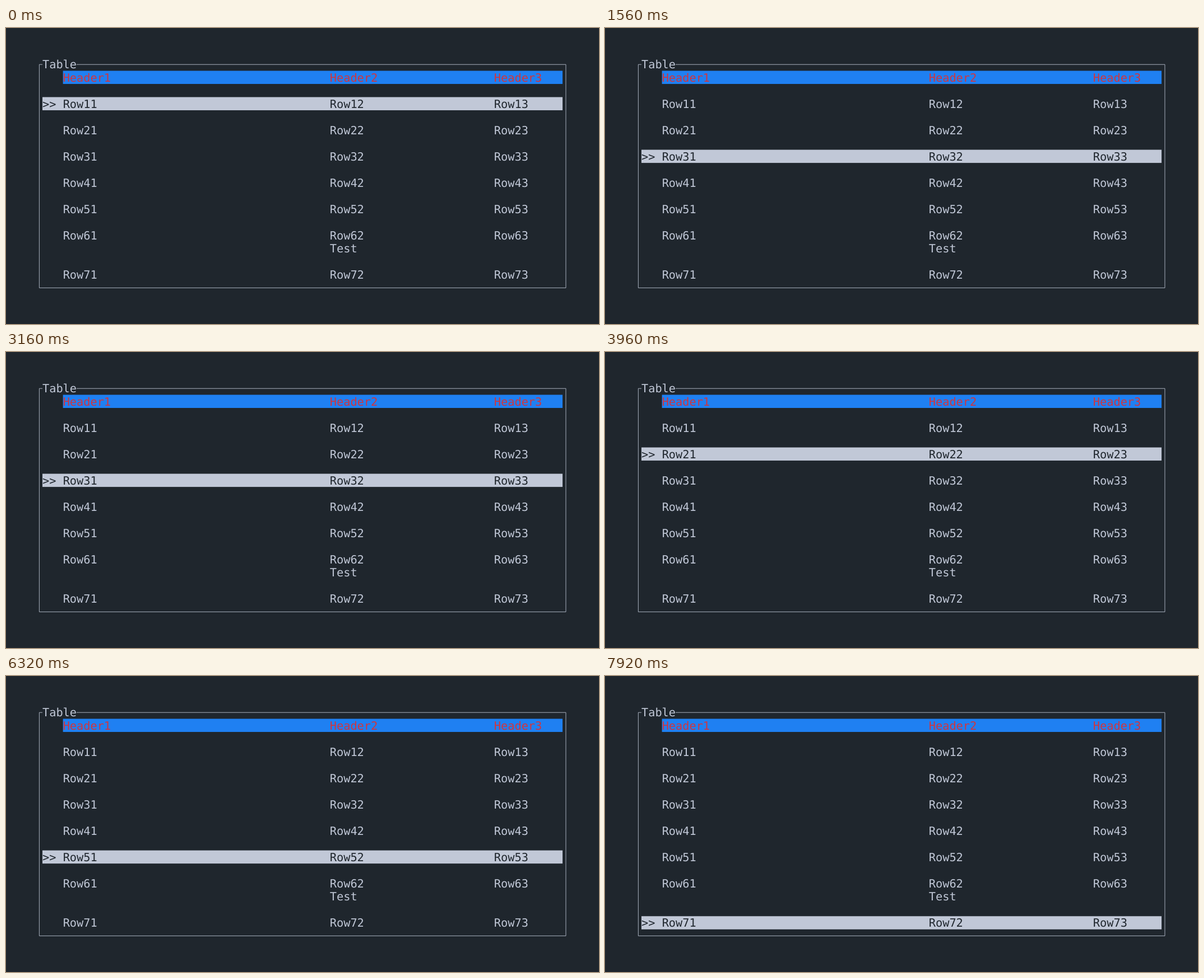
Write an HTML page that moves like this. It is 1058 px wide and 529 px high and loops after 8 s.

```html
<!DOCTYPE html>
<html lang="en">
<head>
<meta charset="utf-8">
<title>Table</title>
<style>
  html, body { margin: 0; width: 100%; height: 100%; overflow: hidden; background: #1f262d; }
  svg { display: block; }
  text {
    font: 20.28px "DejaVu Sans Mono", monospace;
    text-rendering: geometricPrecision;
    white-space: pre;
    fill: #c1c8d7;
  }
  .border { fill: none; stroke: #c1c8d7; stroke-opacity: .85; }
  .header rect { fill: #1f80f2; }
  .header text { fill: #d0353f; }
  .row rect, .row .marker { visibility: hidden; }
  .row.selected rect { visibility: visible; fill: #c1c8d7; }
  .row.selected .marker { visibility: visible; }
  .row.selected text { fill: #1f262d; }
</style>
</head>
<body>
<svg id="stage" width="1058" height="529" viewBox="0 0 1058 529"></svg>
<script>
const LEFT = 65, TOP = 52.94, CELL = 12.21, LINE = 23.52, WIDTH = 76;
const COLUMNS = [3, 42, 66];
const LOOP = 8000;
// [start time in ms, selected row]
const STEPS = [[0, 1], [760, 2], [1560, 3], [2360, 4], [3160, 3], [3960, 2],
  [4760, 3], [5560, 4], [6320, 5], [7120, 6], [7920, 7]];

const stage = document.getElementById("stage");

function add(parent, tag, attributes, content = "") {
  const node = document.createElementNS("http://www.w3.org/2000/svg", tag);
  for (const name in attributes) node.setAttribute(name, attributes[name]);
  node.textContent = content;
  return parent.appendChild(node);
}

const label = (parent, column, line, content, className = "") =>
  add(parent, "text", { x: LEFT + column * CELL, y: TOP + line * LINE + 19.1, class: className }, content);

const bar = (parent, column, line) =>
  add(parent, "rect", {
    x: LEFT + column * CELL, y: TOP + line * LINE,
    width: (WIDTH - column) * CELL, height: LINE
  });

function addCells(parent, line, prefix) {
  COLUMNS.forEach((column, i) => label(parent, column, line, prefix + (i + 1)));
}

add(stage, "path", { class: "border", d: "M65 65.2H59.4V464.4H998.9V65.2H126" });
label(stage, 0, 0, "Table");

const header = add(stage, "g", { class: "header" });
bar(header, COLUMNS[0], 1);
addCells(header, 1, "Header");

const rows = [1, 2, 3, 4, 5, 6, 7].map(n => {
  const line = n < 7 ? 1 + 2 * n : 16;
  const row = add(stage, "g", { class: "row" });
  bar(row, 0, line);
  if (n === 6) {
    bar(row, COLUMNS[1], line + 1);
    label(row, COLUMNS[1], line + 1, "Test");
  }
  label(row, 0, line, ">>", "marker");
  addCells(row, line, "Row" + n);
  return row;
});

function render(now) {
  const time = now % LOOP;
  const selected = STEPS.findLast(([start]) => start <= time)[1];
  rows.forEach((row, i) => row.classList.toggle("selected", i + 1 === selected));
}

const origin = performance.now();
function tick() {
  render(performance.now() - origin);
  requestAnimationFrame(tick);
}
tick();
</script>
</body>
</html>
```
